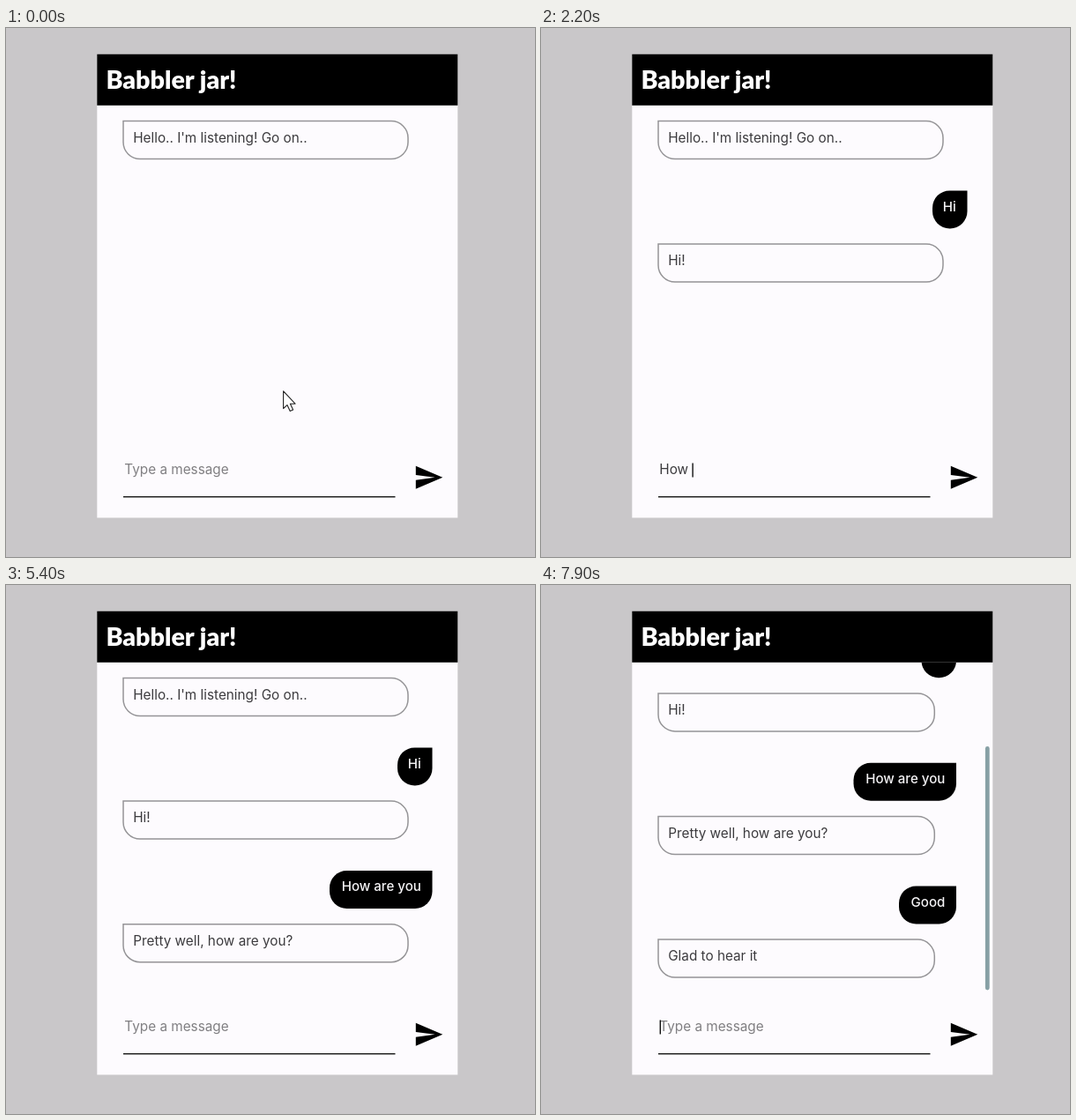
An HTML page for the animation above (8 s loop, 600 by 600 pixels).

```html
<!DOCTYPE html>
<html lang="en">
<head>
<meta charset="utf-8">
<title>Chat</title>
<style>
  html, body { margin: 0; width: 100%; height: 100%; overflow: hidden; background: #c9c7c9; }
  svg { display: block; width: 100%; height: 100%; }
  text { font: 15.3px Inter, "Open Sans", sans-serif; fill: #3c3b3e; white-space: pre; }
  .title { font: 900 28.6px Lato, sans-serif; fill: #fff; }
  .bot { fill: #fdfbfe; stroke: #959497; stroke-width: 1.5; }
  .user { fill: #000; }
  .said { fill: #f4f3f5; font-weight: 500; font-size: 15.1px; }
  .hint { fill: #807f82; }
</style>
</head>
<body>
<svg viewBox="0 0 600 600">
  <clipPath id="view"><rect x="103" y="88" width="409" height="392"/></clipPath>
  <rect width="600" height="600" fill="#c9c7c9"/>
  <rect x="103.3" y="29.7" width="409" height="525.8" fill="#fdfbfe"/>
  <rect x="103.3" y="29.7" width="409" height="58.1"/>
  <text class="title" x="113.4" y="69">Babbler jar!</text>
  <g clip-path="url(#view)"><g id="log"></g></g>
  <rect id="bar" x="503.9" y="183" width="4.8" height="276.5" rx="2.4" fill="#87a0a5"/>
  <text id="field" x="134.3" y="506"></text>
  <rect id="caret" y="493.5" width="1.4" height="16" fill="#111"/>
  <path d="M133 531.8H441.5" stroke="#222" stroke-width="1.4"/>
  <path d="M2 21L23 12 2 3V10L17 12 2 14Z" transform="translate(461.9 492.4) scale(1.45)"/>
  <path id="mouse" d="M314.6 411.8V431.6L318.9 427.6 322.2 434.6 325.6 433.1 322.4 426.2H328Z"
        fill="#fff" stroke="#222" stroke-width="1.1" stroke-linejoin="round"/>
</svg>
<script>
const LOOP = 8000, TICK = 100, BLINK = 460, PAIR = 139.6, SCROLL = 122.2;
const $ = id => document.getElementById(id);

const typing = (text, times) => times.map((at, i) => ({ at, text: text.slice(0, i + 1) }));
const send = at => ({ at, text: '', sent: true });
const events = [
  { at: 100, text: '' },
  ...typing('Hi', [300, 500]), send(830),
  ...typing('How are you', [1400, 1600, 1800, 2100, 2800, 3000, 3200, 3300, 3600, 3700, 3800]), send(3950),
  ...typing('Good', [6200, 6400, 6600, 6800]), send(6930)
];
const talk = [
  ['Hi', 'Hi!', 39.5],
  ['How are you', 'Pretty well, how are you?', 116.5],
  ['Good', 'Glad to hear it', 65]
];

function bot(text, y, right) {
  const r = 19;
  return `<path class="bot" d="M133 ${y}H${right - r}a${r} ${r} 0 0 1 ${r} ${r}v5a${r} ${r} 0 0 1 ${-r} ${r}H${133 + r}a${r} ${r} 0 0 1 ${-r} ${-r}Z"/>` +
    `<text x="144.2" y="${y + 24.3}">${text}</text>`;
}

function user(text, y, right, width) {
  const r = 19.5;
  return `<path class="user" d="M${right} ${y}v${43 - r}a${r} ${r} 0 0 1 ${-r} ${r}h${2 * r - width}a${r} ${r} 0 0 1 ${-r} ${-r}v${2 * r - 43}a${r} ${r} 0 0 1 ${r} ${-r}Z"/>` +
    `<text class="said" x="${right - 12.6}" y="${y + 23.3}" text-anchor="end">${text}</text>`;
}

function drawLog(count) {
  const full = count === 3;
  const botRight = full ? 446.3 : 456, userRight = full ? 471 : 483.5;
  let out = bot("Hello.. I'm listening! Go on..", 105.6, botRight);
  talk.slice(0, count).forEach(([said, reply, width], i) => {
    out += user(said, 184.4 + i * PAIR, userRight, width);
    out += bot(reply, 245.1 + i * PAIR, botRight);
  });
  $('log').innerHTML = out;
  $('log').setAttribute('transform', `translate(0 ${full ? -SCROLL : 0})`);
}

const show = (id, on) => $(id).setAttribute('visibility', on ? 'visible' : 'hidden');
let shown = -1;

function render(now) {
  const t = Math.floor(now % LOOP / TICK) * TICK;
  const past = events.filter(e => e.at <= t);
  const last = past[past.length - 1];
  const count = past.filter(e => e.sent).length;
  if (count !== shown) drawLog(shown = count);

  const text = last ? last.text : '';
  const field = $('field');
  field.textContent = text || 'Type a message';
  field.setAttribute('class', text ? '' : 'hint');
  $('caret').setAttribute('x', text ? 134.3 + field.getComputedTextLength() : 134.6);
  show('caret', last && (t - last.at) % (2 * BLINK) < BLINK);
  show('mouse', t < 1500);
  show('bar', count === 3);
}

const start = performance.now();
function loop() {
  render(performance.now() - start);
  requestAnimationFrame(loop);
}
loop();
</script>
</body>
</html>
```
